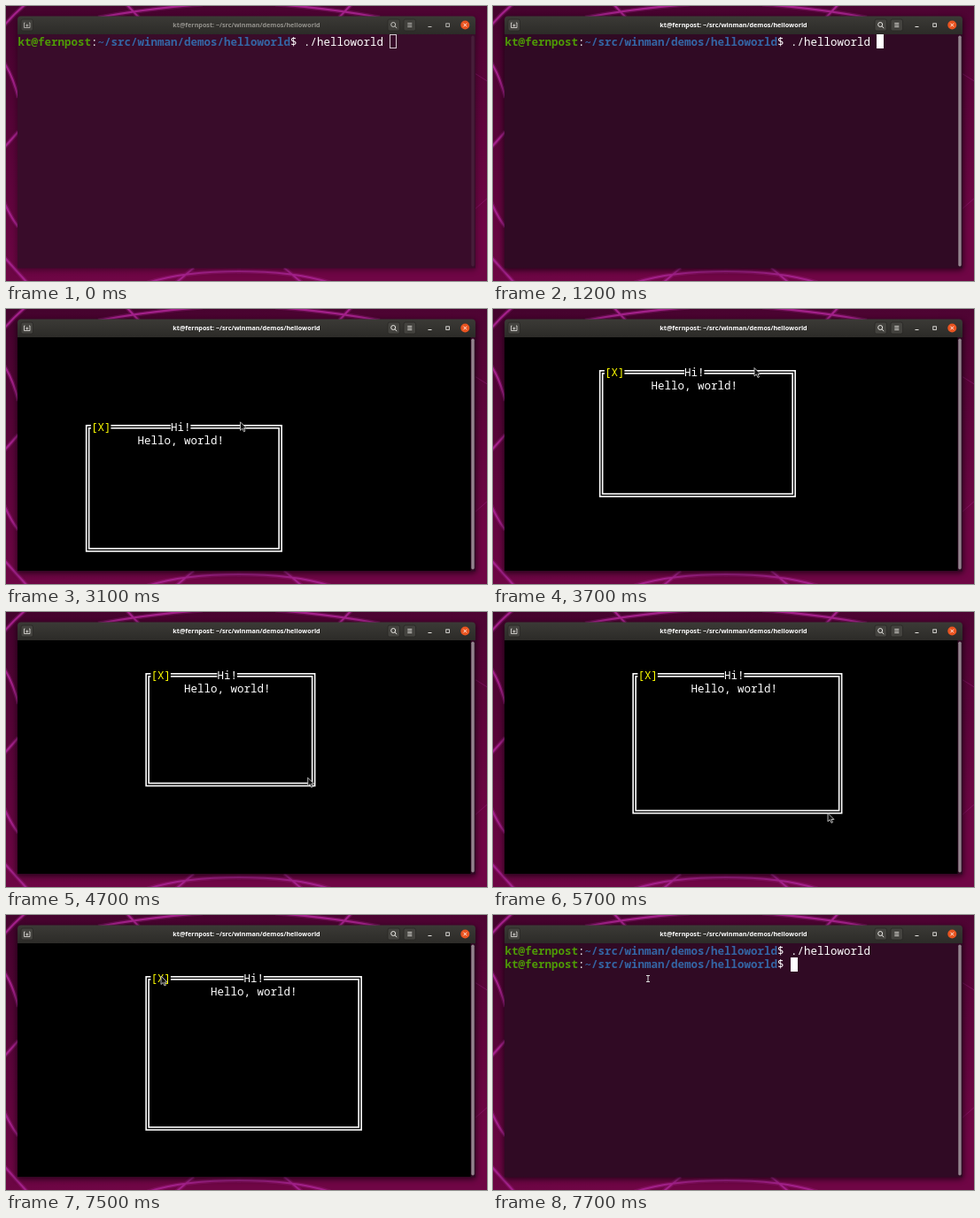
An HTML page for the animation above (8000 ms loop, 543x311 px).

```html
<!DOCTYPE html>
<html lang="en">
<head>
<meta charset="utf-8">
<title>Terminal window demo</title>
<style>
  html, body { margin: 0; width: 100%; height: 100%; overflow: hidden; background: #50052f; }
  svg { display: block; width: 543px; height: 311px; }
  text { white-space: pre; }
  .mono { font: 12.5px "Noto Sans Mono", "DejaVu Sans Mono", monospace; fill: #fff; }
  .bold { font-weight: 700; }
  .host { fill: #4e9a06; }
  .path { fill: #3465a4; }
  .close { fill: #ff0; }
  .title { font: 700 7.2px "Noto Sans", "Open Sans", sans-serif; text-anchor: middle; }
</style>
</head>
<body>
<svg viewBox="0 0 543 311" xmlns="http://www.w3.org/2000/svg">
  <defs>
    <linearGradient id="wall" x1="0" y1="0" x2="0.25" y2="1">
      <stop offset="0" stop-color="#44032d"/>
      <stop offset="1" stop-color="#6f0645"/>
    </linearGradient>
    <linearGradient id="bar" x1="0" y1="0" x2="0" y2="1">
      <stop offset="0" stop-color="#3b3a36"/>
      <stop offset="1" stop-color="#2c2b28"/>
    </linearGradient>
    <filter id="soft" x="-10%" y="-10%" width="120%" height="120%"><feGaussianBlur stdDeviation="3"/></filter>
    <path id="arcs" d="M104 13Q165 2 222-2M136-2L150 13M160 313Q200 300 265 300M192 313L212 296"/>
    <g id="lines">
      <use href="#arcs"/>
      <use href="#arcs" transform="matrix(-1 0 0 1 526 0)"/>
      <path d="M-2 22Q9 9 22-2M-2 64Q8 80 14 104M-2 160L14 142M-2 222Q6 240 14 250M-2 284L24 313"/>
    </g>
  </defs>

  <rect width="543" height="311" fill="url(#wall)"/>
  <g fill="none" stroke="#a3218a">
    <use href="#lines" stroke-width="5" opacity=".3"/>
    <use href="#lines" stroke-width="2.2"/>
    <path d="M529 76L545 86M529 230L545 216" opacity=".4"/>
  </g>

  <rect id="shadow" x="12" y="13" width="519" height="286" rx="4" filter="url(#soft)"/>
  <path d="M13 32V15.500Q13 11.500 17 11.500H526Q530 11.500 530 15.500V32Z" fill="url(#bar)"/>
  <g id="controls" fill="none" stroke="#e6e4e0">
    <g fill="#44433f" stroke="#292825" stroke-width=".8">
      <rect x="17" y="15" width="13.500" height="13" rx="2"/>
      <rect x="431" y="15" width="13.500" height="13" rx="2"/>
      <rect x="449" y="15" width="13.500" height="13" rx="2"/>
    </g>
    <path d="M21.500 19H20.500V24.500H27V19H26M22.300 22H25.300M23.800 20.500V23.500" stroke-width=".8"/>
    <circle cx="437.200" cy="21" r="2.500"/>
    <path d="M439 22.800L441.300 25.200"/>
    <path d="M453.300 19.500H458.300M453.300 21.500H458.300M453.300 23.500H458.300" stroke-width=".9"/>
    <path d="M476.500 23.500H480.500"/>
    <rect x="496.800" y="19.800" width="3.600" height="3.600" stroke-width=".9"/>
  </g>
  <circle cx="518.300" cy="21.500" r="5" fill="#e95420"/>
  <path d="M516.500 19.700L520.100 23.300M520.100 19.700L516.500 23.300" stroke="#fff" stroke-width=".9"/>
  <text id="title" class="title" x="271.500" y="24"></text>

  <rect id="pane" x="13" y="32" width="517" height="264.500"/>
  <rect id="screen" x="13" y="32" width="511.500" height="264" fill="#000"/>
  <rect id="thumb" x="525.300" y="33.500" width="3.400" height="261" rx="1.700" fill="#a59aa1"/>

  <g id="shell" class="mono">
    <g id="firstLine"></g>
    <g id="secondLine"></g>
  </g>
  <rect id="caret" stroke="#d8ccd4"/>

  <g id="dialog" class="mono">
    <g fill="none" stroke="#fff" stroke-width="1.600">
      <rect id="outer"/>
      <rect id="inner"/>
    </g>
    <rect id="closeGap"/>
    <rect id="headGap"/>
    <g id="labels"></g>
  </g>

  <path id="arrow" d="M0 0V9.500L2.300 7.400L4 11L5.500 10.300L4 7H7Z" fill="#111" stroke="#ddd" stroke-width=".8"/>
  <path id="beam" d="M173 68.500H177M175 68.500V75.500M173 75.500H177" fill="none" stroke="#ddd"/>
</svg>
<script>
const LOOP = 8000, STEP = 100;
const LAUNCH = 1500, OPEN = 1600, POINTER_IN = 2100, QUIT = 7700;
const CELL_W = 7.5, CELL_H = 15.47, LEFT = 13.4, MID = 40.4;
const USER = 'kt@fernpost', DIR = '~/src/winman/demos/helloworld', COMMAND = './helloworld';
const PROMPT_COLS = USER.length + DIR.length + 3;

// Turning points of the hand: time, x, y. It eases from one to the next.
const hand = [
  [2100, 242, 190], [2350, 190, 125], [2500, 211, 107], [2800, 218, 115],
  [3050, 255, 130], [3350, 383, 100], [3600, 267, 66], [3800, 323, 67],
  [4200, 376, 209], [4900, 332, 182], [5600, 400, 224], [5800, 356, 231],
  [6050, 433, 234], [6400, 398, 233], [7400, 175, 69]
];
const MOVE = { from: 2800, to: 3800 }, RESIZE = { from: 4200, to: 6400 };
const TRAIL = 30;

const $ = id => document.getElementById(id);
const colX = col => LEFT + col * CELL_W;
const rowY = row => MID + row * CELL_H;
const set = (el, attrs) => { for (const k in attrs) el.setAttribute(k, attrs[k]); };
const show = (id, on) => { $(id).style.display = on ? '' : 'none'; };
const clamp = (v, lo, hi) => Math.min(hi, Math.max(lo, v));
const mix = (a, b, k) => a + (b - a) * k;
const mixRgb = (a, b, k) => `rgb(${a.map((v, i) => Math.round(mix(v, b[i], k)))})`;
const smooth = k => k * k * (3 - 2 * k);

function addText(parent, content, cls = '') {
  const el = document.createElementNS('http://www.w3.org/2000/svg', 'text');
  el.textContent = content;
  el.setAttribute('class', cls);
  return parent.appendChild(el);
}
const place = (el, col, row) => set(el, { x: colX(col), y: rowY(row) + 4.6 });

function handAt(time) {
  const t = clamp(time, hand[0][0], hand[hand.length - 1][0]);
  const i = Math.max(1, hand.findIndex(p => p[0] >= t));
  const [t0, x0, y0] = hand[i - 1], [t1, x1, y1] = hand[i];
  const k = smooth((t - t0) / (t1 - t0));
  return { x: mix(x0, x1, k), y: mix(y0, y1, k) };
}

// Whole cells the hand has dragged so far; the dialog trails slightly behind it.
function dragged({ from, to }, t) {
  const a = handAt(from), b = handAt(clamp(t - TRAIL, from, to));
  return [Math.round((b.x - a.x) / CELL_W), Math.round((b.y - a.y) / CELL_H)];
}

function addPrompt(id, row) {
  let col = 0;
  for (const [part, cls] of [[USER, 'bold host'], [':'], [DIR, 'bold path'], ['$']]) {
    place(addText($(id), part, cls), col, row);
    col += part.length;
  }
}
addPrompt('firstLine', 0);
addPrompt('secondLine', 1);
place(addText($('firstLine'), COMMAND), PROMPT_COLS, 0);
$('title').textContent = `${USER}: ${DIR}`;

const closeLabel = addText($('labels'), '[X]', 'close');
const heading = addText($('labels'), 'Hi!');
const message = addText($('labels'), 'Hello, world!');

function drawDialog(t) {
  const [dx, dy] = dragged(MOVE, t), [dw, dh] = dragged(RESIZE, t);
  const col = 5 + dx, row = 5 + dy, cols = 30 + dw, rows = 10 + dh;
  const x = colX(col) + CELL_W / 2, y = rowY(row);
  const w = (cols - 1) * CELL_W, h = (rows - 1) * CELL_H;
  const frame = (id, d) => set($(id), { x: x + d, y: y + d, width: w - 2 * d, height: h - 2 * d });
  frame('outer', -1.5);
  frame('inner', 1.5);

  const centred = text => col + Math.floor((cols - text.textContent.length) / 2);
  const onBorder = (text, gap, c) => {
    set($(gap), { x: colX(c), y: y - 4, width: 3 * CELL_W, height: 8, fill: '#000' });
    place(text, c, row);
  };
  onBorder(closeLabel, 'closeGap', col + 1);
  onBorder(heading, 'headGap', centred(heading));
  place(message, centred(message), row + 1);
}

function drawCaret(t, done) {
  const hollow = t < 100, inset = hollow ? 0.5 : 0;
  show('caret', done || (t < LAUNCH && Math.floor(t / 600) % 2 === 0));
  const col = PROMPT_COLS + (done ? 0 : COMMAND.length + 1);
  set($('caret'), {
    x: Math.round(colX(col)) + inset,
    y: Math.floor(rowY(done ? 1 : 0) - CELL_H / 2) + inset,
    width: 8 - 2 * inset, height: 16 - 2 * inset,
    fill: hollow ? 'none' : '#fff', 'stroke-width': hollow ? 1 : 0
  });
}

function render(time) {
  const t = Math.floor((time % LOOP) / STEP) * STEP;
  const done = t >= QUIT, running = t >= LAUNCH && !done;
  const focus = clamp(t / 300, 0, 1), settle = clamp(t / 900, 0, 1);

  set($('title'), { fill: mixRgb([148, 146, 141], [255, 255, 255], focus) });
  set($('controls'), { opacity: mix(0.8, 1, focus) });
  set($('shadow'), { opacity: mix(0.35, 0.6, settle) });
  set($('pane'), { fill: mixRgb([57, 12, 42], [48, 10, 36], settle) });
  set($('thumb'), { opacity: mix(0.12, 0.85, settle) });

  show('screen', running);
  show('shell', !running);
  show('secondLine', done);
  drawCaret(t, done);

  show('dialog', running && t >= OPEN);
  drawDialog(t);

  const { x, y } = handAt(t);
  show('arrow', running && t >= POINTER_IN);
  show('beam', done);
  set($('arrow'), { transform: `translate(${x} ${y})` });
}

const start = performance.now();
function tick() {
  render(performance.now() - start);
  requestAnimationFrame(tick);
}
tick();
</script>
</body>
</html>
```
